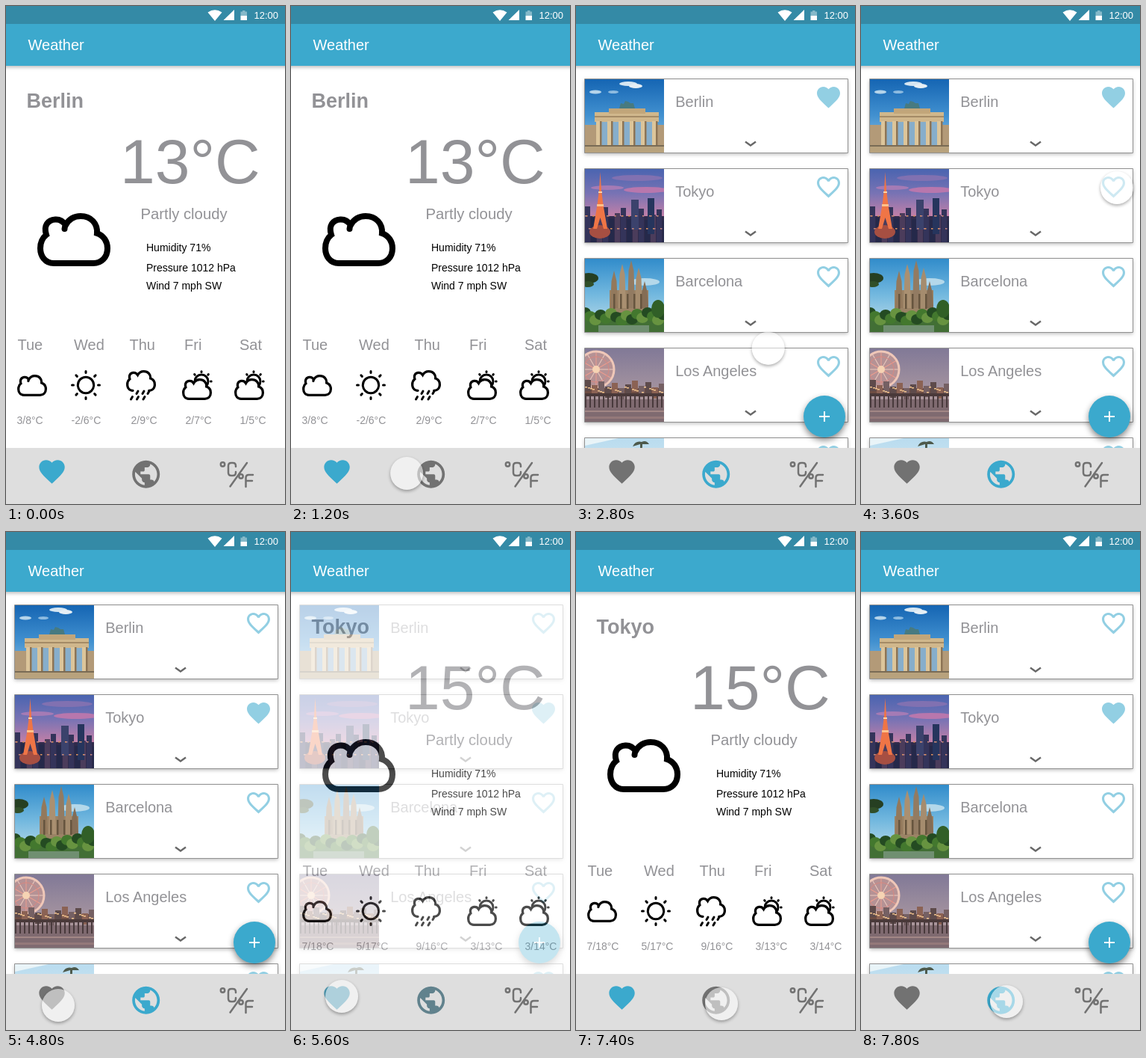
Recreate the animation shown at these times as an HTML page. Size 374 by 666 pixels, loop 8 s.

```html
<!DOCTYPE html>
<html lang="en">
<head>
<meta charset="utf-8">
<title>Weather</title>
<style>
  html, body { margin: 0; height: 100%; overflow: hidden; background: #fff; }
  #stage { display: block; width: 374px; height: 666px; font: 20px "Liberation Sans", Arial, sans-serif; }
  #cursor { position: absolute; left: -22px; top: -22px; width: 44px; height: 44px; border-radius: 50%;
    background: #ffffff8c; box-shadow: 0 2px 4px #0005; }
  .gray { fill: #929296; }
  .line { fill: none; stroke-linecap: round; stroke-linejoin: round; }
  .icon { fill: none; stroke: #000; stroke-width: 3; stroke-linecap: round; }
  .small { font-size: 14px; }
  .low { filter: drop-shadow(0 2px 2.5px #0004); }
  .high { filter: drop-shadow(0 4px 4px #0007); }
</style>
</head>
<body>
<svg id="stage" viewBox="0 0 374 666">
  <defs>
    <path id="heart" d="M12 21.35l-1.45-1.32C5.4 15.36 2 12.28 2 8.5 2 5.42 4.42 3 7.5 3c1.74 0 3.41.81 4.5 2.09C13.09 3.81 14.76 3 16.5 3 19.58 3 22 5.42 22 8.5c0 3.78-3.4 6.86-8.55 11.54z"/>
    <path id="outline" d="M16.5 3c-1.74 0-3.41.81-4.5 2.09C10.91 3.81 9.24 3 7.5 3 4.42 3 2 5.42 2 8.5c0 3.78 3.4 6.86 8.55 11.54L12 21.35l1.45-1.32C18.6 15.36 22 12.28 22 8.5 22 5.42 19.58 3 16.5 3zm-4.4 15.55l-.1.1-.1-.1C7.14 14.24 4 11.39 4 8.5 4 6.5 5.5 5 7.5 5c1.54 0 3.04.99 3.57 2.36h1.87C13.46 5.99 14.96 5 16.5 5c2 0 3.5 1.5 3.5 3.5 0 2.89-3.14 5.74-7.9 10.05z"/>
    <path id="globe" d="M12 2C6.48 2 2 6.48 2 12s4.48 10 10 10 10-4.48 10-10S17.52 2 12 2zm-1 17.93c-3.95-.49-7-3.85-7-7.93 0-.62.08-1.21.21-1.79L9 15v1c0 1.1.9 2 2 2v1.93zm6.9-2.54c-.26-.81-1-1.39-1.9-1.39h-1v-3c0-.55-.45-1-1-1H8v-2h2c.55 0 1-.45 1-1V7h2c1.1 0 2-.9 2-2v-.41c2.93 1.19 5 4.06 5 7.41 0 2.08-.8 3.97-2.1 5.39z"/>
  </defs>
  <g id="list"></g>
  <g id="weather"></g>
  <g>
    <path class="low" fill="#3ca9cd" d="M-5-5H379V80H-5z"/>
    <path fill="#348aa6" d="M0 0H374V24H0z"/>
    <text x="29.500" y="59" fill="#fff">Weather</text>
    <g fill="#fff">
      <path d="M280 20L270.500 8.500Q280 2 289.500 8.500zM306 5V19H291.500z"/>
      <path opacity=".4" d="M314.500 7.500h2.500v-1.500h3.500v1.500h2.500V13h-8.500z"/>
      <path d="M314.500 13h8.500v6h-8.500z"/>
      <text x="332.500" y="17" font-size="13">12:00</text>
    </g>
  </g>
</svg>
<div id="cursor"></div>
<script>
const $ = id => document.getElementById(id);
const BLUE = '#3ba9cd', GRAY = '#727272', PALE = '#92cfe3';
const repeat = (n, draw) => Array.from({ length: n }, (_, i) => draw(i)).join('');
const rect = (x, y, w, h, fill) => `<rect x="${x}" y="${y}" width="${w}" height="${h}" fill="${fill}"/>`;
const shape = (d, fill) => `<path d="${d}" fill="${fill}"/>`;
const text = (x, y, s, attrs = 'class="gray"') => `<text x="${x}" y="${y}" ${attrs}>${s}</text>`;
const use = (id, x, y, scale, fill) =>
  `<use href="#${id}" transform="translate(${x} ${y}) scale(${scale})" fill="${fill}"/>`;

const nav = (heart, globe) => rect(0, 591, 374, 75, '#dedede') +
  use('heart', 40.9, 602, 1.72, heart) + use('globe', 165.5, 604, 1.85, globe) +
  `<g class="line" stroke="${GRAY}" stroke-width="2.500">
    <circle cx="290.500" cy="613" r="2.700"/><circle cx="315" cy="629" r="2.700"/>
    <path d="M308 616v-1q0-4-4-4h-2q-4 0-4 4v9q0 4 4 4h2q4 0 4-4v-1M323 611L300.500 642.500
      M321.500 643v-12q0-4 4-4h5.500M321.500 635h8.500"/></g>`;

// Weather page
const CLOUD = 'M64 344C52 344 46 334 46 324C46 316 49 310 54 306C50 294 56 286 66 285.500C74 285 78 290 80 293' +
  'C85 284 92 281 100 281C114 281 123 291 122 304C131 307 136 315 136 324C136 336 128 344 117 344';
const cloud = (x, y, scale, end = 'zM80 293q-1.500 2.500-1.500 5', fill = 'none') =>
  `<path class="icon" style="stroke-width:8;fill:${fill}" transform="translate(${x} ${y}) scale(${scale})"
    d="${CLOUD}${end}"/>`;
const sun = (x, y, r, near, far, rays) => `<circle class="icon" cx="${x}" cy="${y}" r="${r}"/>` +
  repeat(rays, i => `<path class="icon" d="M${near} 0H${far}" transform="translate(${x} ${y}) rotate(${-45 * i})"/>`);
const partly = x => sun(x + 26, 502, 9, 12.5, 13.2, 5) + cloud(x - 17.1, 385, .408, 'z', '#fff');
const rain = cloud(143.9, 374, .408, '') + repeat(6, i =>
  `<path class="icon" d="M${[177, 185, 192, 169.5, 177.5, 186][i]} ${i < 3 ? 515 : 522.5}l-2 3.500"/>`);

const days = ['Tue', 'Wed', 'Thu', 'Fri', 'Sat'];
const dayX = [15.5, 91, 165.5, 239, 313];
const rangeX = [14.5, 87.5, 167.5, 240.5, 313.5];
const cities = {
  Berlin: ['13°C', ['3/8', '-2/6', '2/9', '2/7', '1/5']],
  Tokyo: ['15°C', ['7/18', '5/17', '9/16', '3/13', '3/14']],
};
function weatherPage(city) {
  const [now, ranges] = cities[city];
  return rect(0, 80, 374, 520, '#fff') +
    text(27.5, 136, city, 'class="gray" font-weight="bold" font-size="27"') +
    text(153, 237, now, 'class="gray" font-size="84"') +
    text(180.5, 285, 'Partly cloudy', 'class="gray" font-size="20.300"') +
    text(188, 328, 'Humidity 71%', 'class="small"') +
    text(188, 355, 'Pressure 1012 hPa', 'class="small"') +
    text(188, 379, 'Wind 7 mph SW', 'class="small"') +
    cloud(0, 0, 1) + cloud(-2.1, 380, .408) + sun(107, 507, 10.7, 16.5, 18.5, 8) +
    rain + partly(236) + partly(306) +
    days.map((day, i) => text(dayX[i], 460, day) +
      text(rangeX[i], 559, ranges[i] + '°C', 'class="gray small"')).join('') +
    nav(BLUE, GRAY);
}

// City list: each picture is 106 by 98
const sky = (id, ...colors) => `<linearGradient id="${id}" x2="0" y2="1">` +
  colors.map((c, i) => `<stop offset="${i / (colors.length - 1)}" stop-color="${c}"/>`).join('') +
  `</linearGradient>` + rect(0, 0, 106, 98, `url(#${id})`);
const blob = (x, y, rx, ry, fill) => `<ellipse cx="${x}" cy="${y}" rx="${rx}" ry="${ry}" fill="${fill}"/>`;
const spire = (x, top, w, fill) => shape(`M${x - w} 66L${x - w * .7} ${top + 14}L${x} ${top}L${x + w * .7} ${top + 14}L${x + w} 66z`, fill);

const gate = sky('day', '#1565b3', '#4291d0', '#9fcbe6') +
  blob(58, 6, 12, 3, '#d5e6f2') + blob(68, 9, 9, 3, '#e6eff5') + blob(14, 17, 8, 2.5, '#b5d4ea') +
  blob(38, 17, 7, 2, '#8dbbe0') + rect(0, 61, 106, 30, '#b39a78') + rect(18, 57, 76, 32, '#87aecb') +
  rect(13, 44, 86, 13, '#d0b78c') + rect(32, 39, 49, 7, '#c2a67a') + rect(13, 49, 86, 2, '#a48b66') +
  repeat(6, i => rect(15 + i * 15, 56, 6, 33, '#dcc59a') + rect(20 + i * 15, 56, 2.5, 33, '#8d7455')) +
  shape('M46 39l2-7 4 1 2-4 4 1 3 2 4 0 2 7z', '#477a80') + rect(0, 88, 106, 10, '#b8a27d') + rect(0, 88, 106, 2, '#796b55');

const tower = sky('dusk', '#4a64b0', '#7873b4', '#c780a6', '#6f5582') +
  blob(70, 12, 34, 4, '#8171b1') + blob(82, 28, 30, 4, '#b877ad') + blob(30, 25, 22, 3, '#a57bb5') +
  rect(0, 63, 106, 35, '#302b4b') +
  repeat(14, i => rect(i * 8, 50 + i * 37 % 22, 7, 48, ['#34345a', '#25294a', '#4b3c5b'][i % 3])) +
  rect(62, 41, 10, 40, '#3b426c') + rect(84, 39, 9, 48, '#26355d') +
  repeat(54, i => rect(i * 43 % 105, 62 + i * 17 % 34, 1.5, 1.5, i % 3 ? '#dc925e' : '#a9799c')) +
  blob(20, 84, 14, 9, '#a64f42') +
  shape('M20.500 4L22 28L24.500 48L30 80H25L20.500 65L16 80H11L16.500 48L19 28z', '#ef7546') +
  rect(16, 47, 9, 3, '#ffc18b') + rect(18, 30, 5, 2, '#ffd4a7');

const church = sky('noon', '#318ccb', '#74b9df', '#c6e0ea') + blob(80, 31, 20, 5, '#b4d8ea') +
  rect(33, 42, 52, 34, '#9b8366') + spire(39, 16, 5, '#93795c') + spire(50, 7, 5, '#aa9071') +
  spire(62, 2, 5, '#927b62') + spire(72, 12, 5, '#a58c6e') + spire(80, 30, 5, '#846d55') +
  repeat(5, i => rect(38 + i * 9, 47, 2.5, 20, '#66553f')) + rect(0, 72, 106, 26, '#426f35') +
  repeat(16, i => blob(i * 7, 72 + i * 29 % 12, 8, 7, ['#244b22', '#43782e', '#679340'][i % 3])) +
  blob(5, 26, 13, 7, '#263f22') + blob(4, 34, 8, 4, '#314f29') + blob(98, 67, 9, 12, '#315f27') +
  rect(18, 89, 68, 9, '#708f71');

const wheel = repeat(12, i =>
  `<path d="M15 28h24" stroke="${i % 2 ? '#ec9c8e' : '#eccabe'}" transform="rotate(${i * 30} 15 28)"/>`);
const pier = sky('eve', '#817997', '#a0909e', '#b99c93') + rect(0, 68, 106, 30, '#7f6a70') +
  blob(15, 28, 24, 24, '#b59295') + wheel +
  `<circle cx="15" cy="28" r="24" fill="none" stroke="#efc7b8" stroke-width="3"/>` +
  `<circle cx="15" cy="28" r="17" fill="none" stroke="#d98780"/>` + blob(15, 28, 5, 5, '#f6d3b3') +
  rect(0, 53, 106, 8, '#6d4d43') +
  repeat(13, i => rect(i * 9, 42 + i * 31 % 12, 8, 15, ['#5e4b4b', '#8b6254', '#756063'][i % 3])) +
  repeat(24, i => rect(i * 23 % 105, 51 + i * 7 % 8, 3, 1.5, '#f0c28c')) + rect(0, 60, 106, 4, '#4a3939') +
  repeat(18, i => rect(i * 6, 62, 2, 17, '#493a3c')) + rect(0, 83, 106, 2, '#a28785') + rect(0, 91, 106, 3, '#94797a');

const palm = sky('pale', '#b9dcef', '#e6eff3') + shape('M0 0H45L0 10z', '#e9f4f8') +
  shape('M64 11Q68 3 76 5Q82 2 86 8L77 8L76 40H74L74 8z', '#4d594b');

const names = ['Berlin', 'Tokyo', 'Barcelona', 'Los Angeles', ''];
const pictures = [gate, tower, church, pier, palm];
$('list').innerHTML = rect(0, 80, 374, 520, '#fff') + names.map((name, i) =>
  `<g transform="translate(0 ${i * 120})">
    <rect class="low" x="11.500" y="97.500" width="353" height="99" fill="#fff"/>
    <svg x="12" y="98" width="106" height="98">${pictures[i]}</svg>
    <path fill="none" stroke="#919191" d="M11.500 97.500h353v99h-353z"/>
    ${text(133.2, 135, name)}
    <path fill="none" stroke="#686868" stroke-width="2.400" d="M227 181.500L234 186.500L241 181.500"/>
    <g id="fav${i}">${use('outline', 319.9, 103.35, 1.55, PALE)}</g>
  </g>`).join('') +
  `<circle class="high" cx="333" cy="549" r="28" fill="${BLUE}"/>
   <path stroke="#fff" stroke-width="2" d="M326 549h14M333 542v14"/>` + nav(GRAY, BLUE);

// Keys are [time, ...values]
function track(keys, t, ease = p => p) {
  const next = keys.findIndex(k => k[0] > t);
  if (next < 0) return keys.at(-1).slice(1);
  if (!next) return keys[0].slice(1);
  const [a, b] = [keys[next - 1], keys[next]];
  const p = ease((t - a[0]) / (b[0] - a[0]));
  return a.slice(1).map((v, i) => v + (b[i + 1] - v) * p);
}
const smooth = p => p * p * (3 - 2 * p);
const pageFade = [[1600, 1], [2000, 0], [5320, 0], [5720, 1], [7400, 1], [7800, 0]];
const path = [[1000, 143, 624], [1600, 190, 628], [2200, 190, 628], [3500, 343, 243], [3900, 343, 243],
  [4800, 70, 633], [5200, 68, 621], [6000, 68, 621], [6400, 143, 624], [7200, 195, 634], [7600, 195, 628]];
const cursorFade = [[999, 0], [1000, 1], [5700, 1], [6000, 0], [6399, 0], [6400, 1]];

let city;
function showCity(name) {
  if (name === city) return;
  city = name;
  $('weather').innerHTML = weatherPage(name);
  ['Berlin', 'Tokyo'].forEach((n, i) => {
    $('fav' + i).innerHTML = use(n === name ? 'heart' : 'outline', 319.9, 103.35, 1.55, PALE);
  });
}

function draw() {
  const t = Math.floor(performance.now() % 8000 / 200) * 200; // five poses a second
  showCity(t < 3800 ? 'Berlin' : 'Tokyo');
  const [x, y] = track(path, t, smooth);
  $('weather').setAttribute('opacity', track(pageFade, t)[0]);
  $('cursor').style.transform = `translate(${x}px, ${y}px)`;
  $('cursor').style.opacity = track(cursorFade, t)[0];
  requestAnimationFrame(draw);
}
draw();
</script>
</body>
</html>
```
